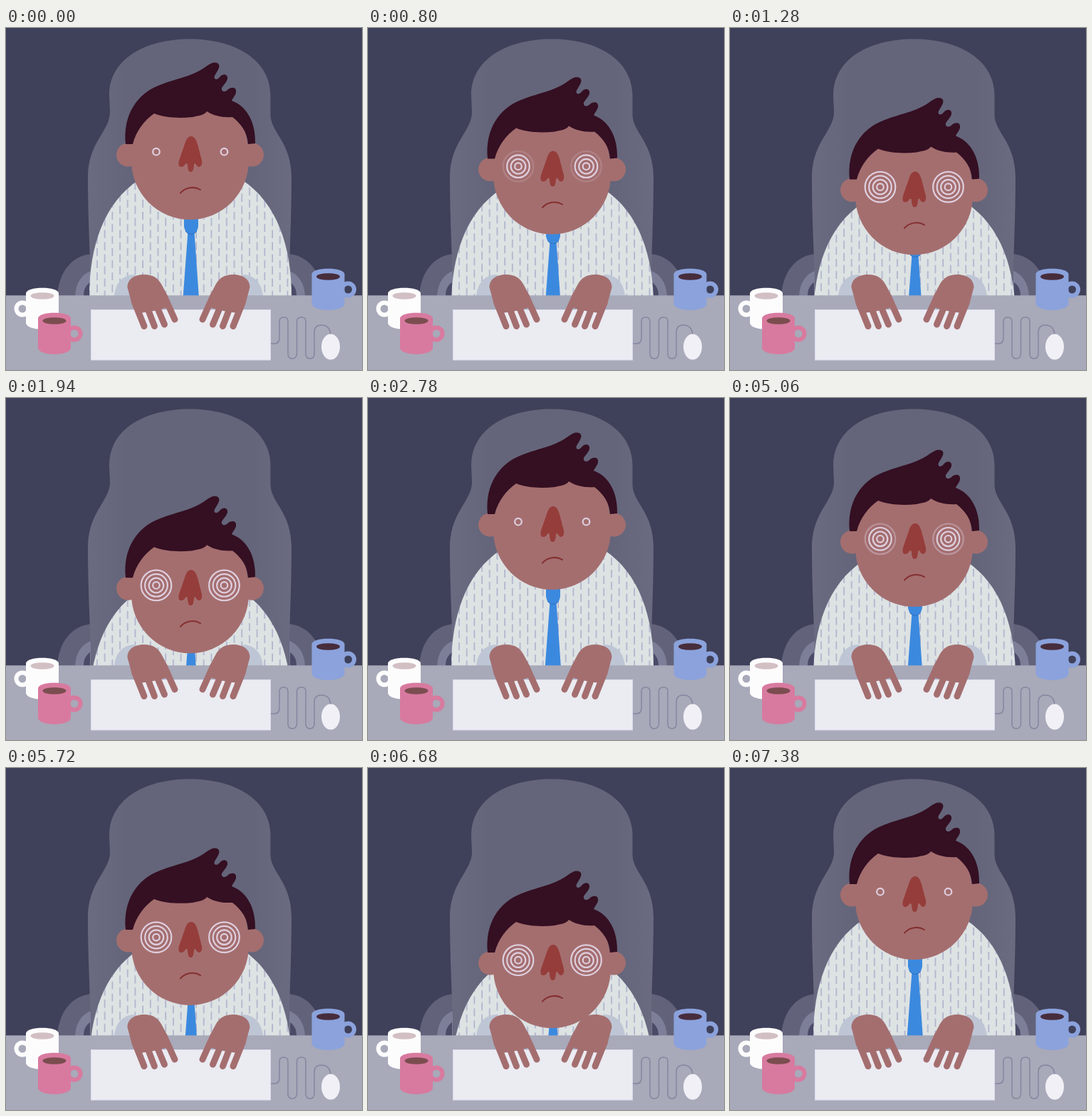
An HTML page that plays this animation: 500x480 px, repeating every 9.18 s.

```html
<!DOCTYPE html>
<html lang="en">
<head>
<meta charset="utf-8">
<title>Sleepy at the desk</title>
<style>
  html, body { margin: 0; width: 100%; height: 100%; overflow: hidden; background: #3f4059; }
  svg { display: block; width: 100%; height: 100%; }
</style>
</head>
<body>
<svg viewBox="0 0 500 480">
  <defs>
    <linearGradient id="chairShade">
      <stop offset="0" stop-color="#6a6b81"/>
      <stop offset=".2" stop-color="#64657a"/>
      <stop offset=".8" stop-color="#64657a"/>
      <stop offset="1" stop-color="#6a6b81"/>
    </linearGradient>
    <pattern id="stripes" x="123" y="2" width="21.4" height="17" patternUnits="userSpaceOnUse">
      <rect width="21.4" height="17" fill="#dde2e3"/>
      <path d="M5 1V12M15.7 0V4M15.7 9.500V17" stroke="#a9aecb" stroke-width="1.5"/>
    </pattern>

    <g id="arm">
      <path d="M72 376C74 343 92 319 121 317V376Z" fill="#62637a"/>
      <path d="M97 376C98 358 106 346 119 341V376Z" fill="#7d7e98"/>
      <path d="M109 376C109 367 112 361 118 357V376Z" fill="#4b4b68"/>
    </g>
    <path id="cuff" d="M152 376C154 357 165 346 181 346L205 376Z" fill="#bec6d5"/>
    <g id="hand" fill="#a46e6f" stroke="#a46e6f" stroke-linecap="round">
      <path stroke="none" d="M170.500 364C170.500 352 181 346 194 346C206 346 214 351 219 361L226.500 375L230 391L217 395L203 398L188 400L177 388Z"/>
      <path stroke-width="9" fill="none" d="M181 386L194 418.500M196 386L208.500 418.500M209 384L222.500 416M222.500 377L237 409"/>
    </g>
    <!-- Mug body, drawn around the centre of its rim -->
    <path id="mug" d="M-23 -3C-23 -13.500 23 -13.500 23 -3V38C23 50.500 -23 50.500 -23 38Z"/>
    <circle id="handle" r="8.500" fill="none" stroke-width="6"/>
  </defs>

  <rect width="500" height="480" fill="#3f4059"/>

  <use href="#arm"/>
  <use href="#arm" transform="matrix(-1 0 0 1 517 0)"/>
  <path fill="url(#chairShade)" d="M120 376C118 320 115 265 115 210C115 160 146 145 146 118L145 94C145 46 192 15.500 258 15.500C324 15.500 371 46 371.500 94V122C372 147 401 160 401 210C401 265 398 320 397 376Z"/>

  <g id="torso">
    <path fill="url(#stripes)" d="M117 480V376C117 308 137 245 187 213H331C381 245 401 308 401 376V480Z"/>
    <path fill="#3b89df" d="M255.500 286H264.500L271.500 386V480H248V386Z"/>
    <path fill="#3b89df" d="M250 250H270V279Q268 289.500 260 289.500Q252 289.500 250 279Z"/>
    <path fill="none" stroke="#2b6fc2" d="M252 285Q255 289.500 260 289.500Q265 289.500 268 285"/>
  </g>

  <g id="head">
    <g fill="#a46e6f">
      <circle cx="171.500" cy="178" r="16.500"/>
      <circle cx="345.500" cy="178" r="16.500"/>
      <path d="M176 186C176 150 190 110 230 100H290C332 105 341 150 341 186A82.500 83 0 0 1 176 186Z"/>
    </g>
    <path fill="#350f22" d="M168 163C164 122 184 92 216 80C242 70 262 68 281 54C288 49 293 47 298 50C302 54 297 60 293 67C291 72 296 74 300 69C304 64 310 64 311 69C312 74 306 79 303 84C302 89 307 91 311 87C316 82 323 83 323 88C324 93 319 97 317 102C339 110 351 134 350 162L340 163C339 147 331 135 318 125C304 126 291 123 282 117C279 122 271 123 262 125C242 127 224 126 208 120C194 130 183 144 178 163Z"/>
    <path fill="#953d3a" d="M260 152C265 152 267 157 269 163L275 186C276 191 274 195 271 195C268 195 267 190 265 190C263 190 265 202 259.500 202C254 202 256 190 254 190C251 190 251 195 246 195C242 195 242 190 243 186L251 163C253 157 255 152 260 152Z"/>
    <path fill="none" stroke="#85302f" stroke-width="2" stroke-linecap="round" d="M245 231.500C252 223.500 264 221.500 273 227"/>
    <g id="eyes" fill="none" stroke="#dfcfdf" stroke-width="2.200"></g>
  </g>

  <use href="#cuff"/>
  <use href="#cuff" transform="matrix(-1 0 0 1 513 0)"/>

  <rect y="375.300" width="500" height="105" fill="#a8a9b9"/>
  <rect x="119.500" y="395.500" width="252" height="70.500" fill="#ebebf2" stroke="#dcdcf0"/>
  <path fill="none" stroke="#85869f" stroke-width="1.500" d="M372 443H377Q384 443 384 435V412Q384 406 390 406T396 412V457Q396 464 402 464T408.500 457V412Q408.500 406 415 406T421 412V457Q421 464 427 464T433 457V427Q433 417 443 417Q455 417 456 431"/>
  <ellipse cx="456" cy="447.500" rx="13" ry="18" fill="#f0f0f6"/>
  <use href="#hand"/>
  <use href="#hand" transform="matrix(-1 0 0 1 513 0)"/>
  <g id="mugs"></g>
</svg>

<script>
const LOOP = 9180, STEP = 60, FIRST_HOLD = 200;
const DOZE_PERIOD = 4200, SECOND_DOZE = 4400;
const SINK_START = 460, SINK_SPEED = 0.0603, SINK_MAX = 96;
const WAKE = 2600;
const WAKE_POSES = [SINK_MAX, 44, 8];

const byId = id => document.getElementById(id);
const clamp = (v, lo, hi) => Math.min(hi, Math.max(lo, v));

function add(parent, tag, attributes) {
  const node = document.createElementNS("http://www.w3.org/2000/svg", tag);
  for (const key in attributes) node.setAttribute(key, attributes[key]);
  return parent.appendChild(node);
}

function addMug(x, y, color, coffee, side) {
  const mug = add(byId("mugs"), "g", { transform: `translate(${x} ${y})`, fill: color, stroke: "none" });
  add(mug, "use", { href: "#handle", x: side * 28, y: 18.5, stroke: color });
  add(mug, "use", { href: "#mug" });
  add(mug, "ellipse", { cy: 0.5, rx: 16.5, ry: 4.8, fill: coffee });
}
addMug(51, 375.5, "#fdfcfd", "#d2bfc4", -1);
addMug(68, 410.5, "#d87a9f", "#7b4d50", 1);
addMug(452.5, 348.5, "#8ba2dc", "#472d3c", 1);

const rings = [0, 1, 2, 3].map(level => {
  const group = add(byId("eyes"), "g", {});
  for (const cx of [211, 306.5]) add(group, "circle", { cx, cy: 173.7, r: 4.8 + level * 5.5 });
  return group;
});

function headDrop(phase) {
  if (phase < WAKE) return clamp((phase - SINK_START) * SINK_SPEED, 0, SINK_MAX);
  return WAKE_POSES[Math.floor((phase - WAKE) / STEP)] || 0;
}

function ringOpacity(level, phase) {
  if (level === 0) return 1;
  if (phase >= WAKE + STEP) return 0;
  return clamp((phase + 70 - 270 * level) / 300, 0, 1);
}

function draw() {
  const time = performance.now() % LOOP;
  const held = time < FIRST_HOLD ? 0 : FIRST_HOLD + Math.floor((time - FIRST_HOLD) / STEP) * STEP;
  const phase = held < SECOND_DOZE ? held : held - DOZE_PERIOD;
  const drop = headDrop(phase);
  byId("head").setAttribute("transform", `translate(0 ${drop})`);
  byId("torso").setAttribute("transform", `translate(0 ${drop * 0.65})`);
  rings.forEach((ring, level) => ring.setAttribute("opacity", ringOpacity(level, phase)));
  requestAnimationFrame(draw);
}
draw();
</script>
</body>
</html>
```
